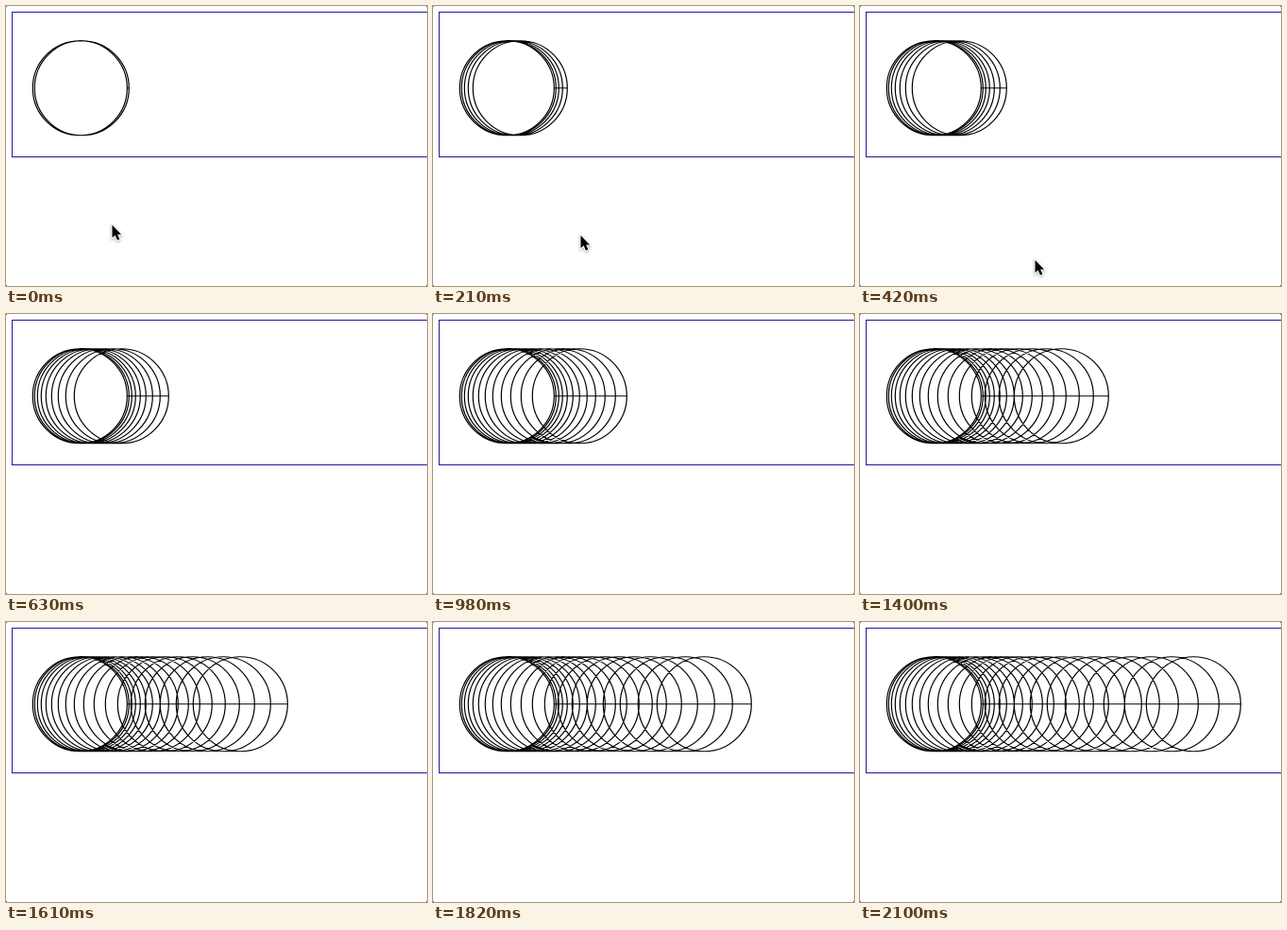
An HTML page with a canvas that plays this animation: 446x296 px, repeating every 2170 ms.

```html
<!DOCTYPE html>
<html lang="en">
<head>
<meta charset="utf-8">
<title>Accelerating circle</title>
<style>
html, body { margin: 0; width: 100%; height: 100%; overflow: hidden; background: #fff; }
canvas { display: block; }
</style>
</head>
<body>
<canvas width="446" height="296"></canvas>
<script>
const W = 446, H = 296, LOOP = 2170, STEP = 70, TICK = 105, R = 50;
const ctx = document.querySelector('canvas').getContext('2d');
const arrow = new Path2D('M0 0V13.6L3.1 10.7L5.5 16L7.9 15L5.6 9.9H9.6Z');
// Pointer tip at each step until it leaves the stage
const pointer = [[112, 231], [127, 234], [142, 238], [156, 242],
                 [167, 247], [177, 256], [185, 268], [191, 284]];

function drawPage() {
  ctx.fillStyle = '#fff';
  ctx.fillRect(0, 0, W, H);
  ctx.lineWidth = 1;
  ctx.strokeStyle = '#1e1898';
  ctx.strokeRect(6.5, 6.5, W, 153);
  ctx.fillStyle = '#777';
  for (const x of [0, W - 1])
    for (const y of [0, H - 1]) ctx.fillRect(x, y, 1, 1);
}

// One path for all arcs, so each is joined to the next along the middle
function drawTrail(last) {
  ctx.strokeStyle = '#000';
  ctx.lineWidth = 1.2;
  ctx.beginPath();
  for (let n = 0; n <= last; n++)
    ctx.arc(78.3 + n * (n + 3) / 2, 86.75, R, 0, 2 * Math.PI);
  ctx.stroke();
}

function drawPointer([x, y]) {
  ctx.save();
  ctx.translate(x + 0.5, y + 0.5);
  ctx.shadowColor = 'rgba(0,0,0,.35)';
  ctx.shadowBlur = 3;
  ctx.shadowOffsetY = 1;
  ctx.strokeStyle = '#fff';
  ctx.lineWidth = 2;
  ctx.stroke(arrow);
  ctx.shadowColor = 'transparent';
  ctx.fillStyle = '#000';
  ctx.fill(arrow);
  ctx.restore();
}

let shown = -1;
function render(now) {
  const step = Math.floor(now % LOOP / STEP);
  if (step !== shown) {
    shown = step;
    drawPage();
    drawTrail(step ? Math.floor(step * STEP / TICK) + 2 : 1);
    if (pointer[step]) drawPointer(pointer[step]);
  }
}

const start = performance.now();
function loop() {
  render(performance.now() - start);
  requestAnimationFrame(loop);
}
loop();
</script>
</body>
</html>
```
